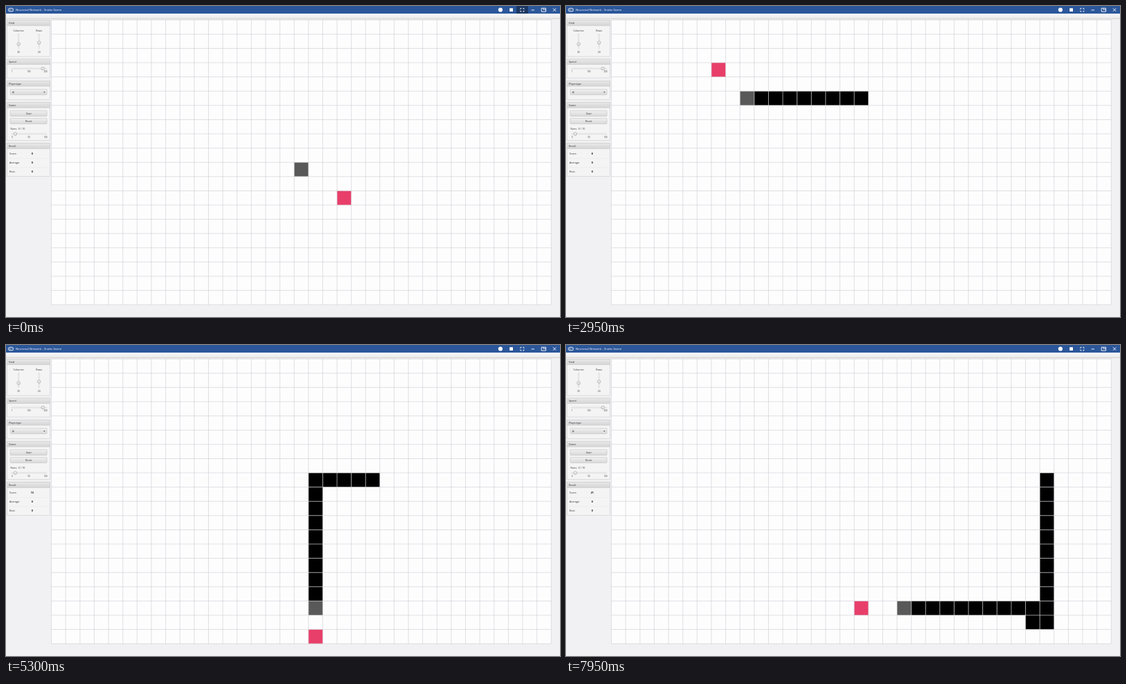
Animation, 800 px wide and 450 px high, one loop 8000 ms. Source, as an HTML page:

```html
<!DOCTYPE html>
<html lang="en">
<head>
<meta charset="utf-8">
<title>Snake Game</title>
<style>
  html, body { margin: 0; width: 100%; height: 100%; overflow: hidden; background: #f1f0f2; }
  svg { display: block; width: 100vw; height: 100vh; }
  text { font-family: "Open Sans", "Noto Sans", sans-serif; font-size: 3.7px; fill: #333; white-space: pre; }
</style>
</head>
<body>
<svg id="stage" viewBox="0 0 800 450">
  <defs>
    <linearGradient id="head" x2="0" y2="1"><stop stop-color="#e9e9e9"/><stop offset="1" stop-color="#d4d4d4"/></linearGradient>
    <linearGradient id="button" x2="0" y2="1"><stop stop-color="#f0f0f0"/><stop offset="1" stop-color="#d8d8d8"/></linearGradient>
    <linearGradient id="strip" x2="0" y2="1"><stop stop-color="#fdfdfd"/><stop offset="1" stop-color="#e6e6e6"/></linearGradient>
  </defs>
</svg>
<script>
const LOOP = 8000, TICK = 50;
const COLS = 35, ROWS = 20, X0 = 65.6, Y0 = 20.2, W = 20.62, H = 20.6;
const HOVER_END = 400;
const stage = document.getElementById('stage');

function add(tag, attrs, parent = stage) {
  const node = document.createElementNS('http://www.w3.org/2000/svg', tag);
  for (const key in attrs) node.setAttribute(key, attrs[key]);
  return parent.appendChild(node);
}
const rect = (x, y, width, height, fill, more) => add('rect', { x, y, width, height, fill, ...more });
const line = (d, stroke, width, more) => add('path', { d, stroke, 'stroke-width': width, fill: 'none', ...more });
function label(x, y, str, more) {
  const node = add('text', { x, y, ...more });
  node.textContent = str;
  return node;
}
const mid = { 'text-anchor': 'middle' };

// Title bar
rect(0, 0, 800, 450, '#f1f0f2');
rect(0, 10.8, 800, 8, 'url(#strip)');
rect(0, 18.3, 800, .6, '#c9c9c9');
rect(0, 0, 800, 11, '#2b579a');
const hover = rect(737, 0, 17, 11, '#1b3763');
rect(3.4, 3.3, 7.2, 4.6, 'none', { rx: 2.3, stroke: '#fff', 'stroke-width': .9 });
line('M4.9 5.6h1.8M5.8 4.7v1.8M8 5.6h1', '#fff', .6);
label(14, 7.4, 'Neuronal Network - Snake Game', { style: 'font-size:4.35px;fill:#fff' });
add('circle', { cx: 714, cy: 5.5, r: 3.1, fill: '#fff' });
rect(727.2, 3.2, 4.8, 4.8, '#fff');
line('M742.9 4.9V3.4h1.5M746.4 3.4h1.5v1.5M747.9 6.6v1.5h-1.5M744.4 8.1h-1.5V6.6', '#fff', .9);
line('M758.6 5.9h4.4', '#fff', .9);
line('M773.2 3.2h6.4v5h-6.4zM776 5.2h3.2M776 5.2v-1.6', '#fff', .9);
line('M790 3.4l4.3 4.3M794.3 3.4l-4.3 4.3', '#fff', .9);

// Side panel
const edge = { stroke: '#c6c6c6', 'stroke-width': .5 };
function pane(title, top, bottom) {
  rect(1.6, top, 62, bottom - top, '#f4f4f4', edge);
  rect(1.6, top, 62, 7.8, 'url(#head)', edge);
  label(4, top + 5.2, title);
}
function button(y) {
  rect(6.2, y, 52.8, 8, 'url(#button)', { rx: .8, stroke: '#bababa', 'stroke-width': .5 });
}
function thumb(cx, cy) {
  add('circle', { cx, cy, r: 2.4, fill: 'url(#button)', stroke: '#a8a8a8', 'stroke-width': .6 });
}
function slider(y, pos, marks) {
  rect(7.5, y - .8, 51.5, 1.6, '#e9e9e9', { rx: .8, stroke: '#cfcfcf', 'stroke-width': .3 });
  thumb(pos, y);
  marks.forEach((mark, i) => {
    line(`M${8.8 + i * 24.2} ${y + 2}v1`, '#aaa', .3);
    label(8.8 + i * 24.2, y + 5.9, mark, { ...mid, style: 'font-size:2.8px' });
  });
}
function column(x, title, pos, value) {
  label(x, 36.8, title, mid);
  rect(x - .8, 40, 1.6, 22, '#e9e9e9', { rx: .8, stroke: '#cfcfcf', 'stroke-width': .3 });
  thumb(x, pos);
  label(x, 68.2, value, { ...mid, style: 'font-size:3.4px' });
}

pane('Field', 20.6, 73);
column(18.2, 'Columns', 55, 35);
column(47.7, 'Rows', 53, 20);
pane('Speed', 77, 104);
slider(90.5, 53.2, [1, 100, 200]);
pane('Playertype', 108.3, 135.5);
button(120.4);
label(9, 125.6, 'AI', { style: 'font-size:3.3px' });
add('path', { d: 'M54 123.9h2.6l-1.3 1.5z', fill: '#444' });
pane('Game', 139.4, 194.3);
button(151.4);
label(32.8, 156.8, 'Start', mid);
button(162.6);
label(32.8, 168, 'Reset', mid);
label(6.4, 179.2, 'Runs:  0 / 10');
slider(185, 13.3, [0, 50, 100]);
pane('Result', 198.6, 246.4);
const [score] = ['Score:', 'Average:', 'Best:'].map((name, i) => {
  const y = 215.2 + i * 13.1;
  label(5, y, name);
  if (i) rect(4, y - 8.3, 57, .3, '#dedede');
  return label(37.8, y, 0, { ...mid, style: 'font-weight:700;fill:#111' });
});

// Board
rect(X0, Y0, COLS * W, ROWS * H, '#fefdfe');
const cell = fill => rect(0, 0, W, H, fill);
function place(node, [c, r]) {
  node.setAttribute('x', X0 + c * W);
  node.setAttribute('y', Y0 + r * H);
}
const meal = cell('#e83f6a');
const parts = Array.from({ length: 24 }, (_, i) => cell(i ? '#000' : '#595959'));
let grid = '';
for (let c = 0; c <= COLS; c++) grid += `M${X0 + c * W} ${Y0}v${ROWS * H}`;
for (let r = 0; r <= ROWS; r++) grid += `M${X0} ${Y0 + r * H}h${COLS * W}`;
line(grid, '#d2d2d6', .7);

// Legs of the route: arrival time and the corners on the way
const legs = [
  [2250, '20,10 20,12 12,12 12,4 31,4 31,14 24,14 24,0 14,0 14,10 6,10 6,12'],
  [3700, '6,14 18,14 18,5 7,5 7,3 5,3 5,12 23,12 23,11 22,11'],
  [4650, '6,11 6,13 31,13'],
  [5900, '33,13 33,8 18,8 18,19 8,19 8,18 23,18'],
  [6750, '30,18 30,4 18,4 18,7 27,7'],
  [7950, '29,7 29,5 31,5 31,14 33,14 33,3 30,3 30,18 29,18 29,17 20,17']
];
const points = str => str.split(' ').map(p => p.split(',').map(Number));
const foods = points('20,12 12,6 29,4 31,14 24,0 9,10 6,14 18,5 7,3 23,12 6,11 10,13 ' +
  '33,10 18,19 8,19 30,4 18,7 29,5 31,14 31,3 29,18 17,17');

const route = [[17, 10]], eaten = [0], stops = [[100, 0]];
for (const [time, corners] of legs) {
  for (const [tc, tr] of points(corners)) {
    let [c, r] = route[route.length - 1];
    while (c !== tc || r !== tr) {
      c += Math.sign(tc - c);
      r += Math.sign(tr - r);
      const n = eaten[eaten.length - 1], [fc, fr] = foods[n];
      route.push([c, r]);
      eaten.push(n + (c === fc && r === fr ? 1 : 0));
    }
  }
  stops.push([time, route.length - 1]);
}

function stepAt(t) {
  if (t <= stops[0][0]) return 0;
  const i = stops.findIndex(s => s[0] >= t);
  const [t0, n0] = stops[i - 1], [t1, n1] = stops[i];
  return Math.round(n0 + (n1 - n0) * (t - t0) / (t1 - t0));
}

function draw(ms) {
  const t = Math.floor(ms % LOOP / TICK) * TICK;
  const step = stepAt(t), n = eaten[step];
  parts.forEach((part, i) => {
    const shown = i <= n;
    part.setAttribute('visibility', shown ? 'visible' : 'hidden');
    if (shown) place(part, route[step - i]);
  });
  place(meal, foods[n]);
  score.textContent = n;
  hover.setAttribute('visibility', t < HOVER_END ? 'visible' : 'hidden');
}

const start = performance.now();
function frame() {
  draw(performance.now() - start);
  requestAnimationFrame(frame);
}
frame();
</script>
</body>
</html>
```
